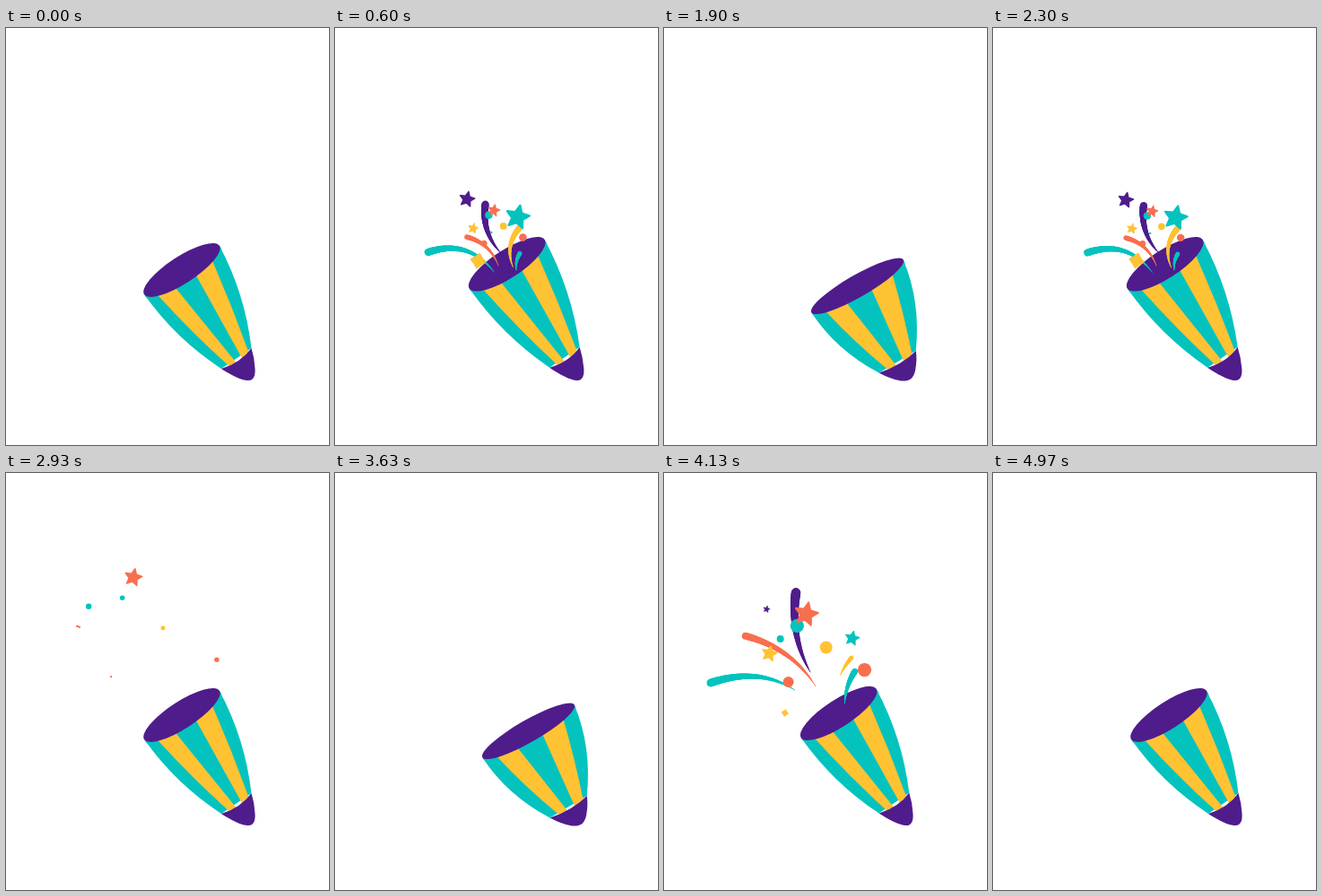
An HTML page with a canvas for the animation above (5 s loop, 360 by 465 pixels).

```html
<!DOCTYPE html>
<html lang="en">
<head>
<meta charset="utf-8">
<title>Party popper</title>
<style>
  html, body { margin: 0; width: 100%; height: 100%; overflow: hidden; background: #fff; }
  canvas { display: block; width: 360px; height: 465px; }
</style>
</head>
<body>
<canvas id="stage"></canvas>
<script>
const W = 360, H = 465, LOOP = 5000, FRAME = 100 / 3;
const PURPLE = '#4f1c8c', TEAL = '#04c3be', YELLOW = '#ffc233', ORANGE = '#f86f50';

const canvas = document.getElementById('stage');
const ctx = canvas.getContext('2d');
const dpr = window.devicePixelRatio || 1;
canvas.width = W * dpr;
canvas.height = H * dpr;

// Each shot winds up, bursts and ends (ms)
const SHOTS = [
  { start: 0, burst: 510, end: 1200 },
  { start: 1200, burst: 2165, end: 3230 },
  { start: 3310, burst: 3805, end: 4700 }
];

// Ages are fractions of a burst; confetti leaves slightly before the burst mark
const HEAD_START = 0.03;
const REF_AGE = 0.393;
const ORIGIN = { x: 195, y: 248 };

const STREAMERS = [
  { color: PURPLE, root: [185, 251], head: [144, 124], bend: -0.12, width: 13, reach: 0.5, delay: 0.02, life: 0.71 },
  { color: YELLOW, root: [199, 268], head: [209, 206], bend: -0.16, width: 8, reach: 0.3, delay: 0, life: 0.48 },
  { color: ORANGE, root: [182, 265], head: [79, 171], bend: 0.13, width: 9.5, reach: 0.5, delay: 0.05, life: 0.71 },
  { color: TEAL, root: [178, 273], head: [52, 234], bend: 0.18, width: 10.7, reach: 0.4, delay: 0, life: 0.72 },
  { color: TEAL, root: [202, 270], head: [214, 215], bend: -0.09, width: 8.3, reach: 0.5, delay: 0.05, life: 0.68 }
];

// Distance is the one reached at REF_AGE; angle in degrees
const CONFETTI = [
  { kind: 'star', color: PURPLE, angle: -130, distance: 125, size: 10.5, life: 0.455 },
  { kind: 'dot', color: TEAL, angle: -121, distance: 90, size: 7.7, life: 0.85 },
  { kind: 'star', color: ORANGE, angle: -112, distance: 97, size: 15, life: 1 },
  { kind: 'star', color: YELLOW, angle: -149, distance: 90, size: 9.6, life: 0.7 },
  { kind: 'dot', color: YELLOW, angle: -105, distance: 55, size: 7, life: 0.85 },
  { kind: 'dot', color: ORANGE, angle: -165, distance: 58, size: 6, life: 0.8 },
  { kind: 'diamond', color: YELLOW, angle: 162, distance: 63, size: 10, life: 0.46 },
  { kind: 'star', color: TEAL, angle: -77, distance: 65, size: 16.7, life: 0.48 },
  { kind: 'dot', color: ORANGE, angle: -45, distance: 40, size: 7.7, life: 0.85 },
  { kind: 'dot', color: TEAL, angle: -136, distance: 90, size: 4.5, life: 0.9, delay: 0.08 }
];

const clamp = x => Math.max(0, Math.min(1, x));
const span = (x, a, b) => clamp((x - a) / (b - a));
const lerp = (a, b, t) => a + (b - a) * t;
const smooth = x => x * x * (3 - 2 * x);
const rad = deg => deg * Math.PI / 180;
const quad = (a, q, b, t) => (1 - t) * (1 - t) * a + 2 * t * (1 - t) * q + t * t * b;

// Local frame: tip near (0, 0), mouth above it
const MOUTH = { y: -145, a: 50, b: 15 };
const SEAM = { l: [-23, -28.7], q: [-0.7, -22.5], r: [17.6, -29.7] };

const rim = k => [MOUTH.a * k, MOUTH.y + MOUTH.b * Math.sqrt(1 - k * k)];
const seam = t => [0, 1].map(i => quad(SEAM.l[i], SEAM.q[i], SEAM.r[i], t));

// Edge from rim to seam, rounder towards the outer sides
function edge(k, t) {
  const from = rim(k), to = seam(t);
  return { from, to, mid: [(from[0] + to[0]) / 2 + 11 * k ** 5, (from[1] + to[1]) / 2 + 3 * Math.abs(k ** 5)] };
}

function panel(color, left, right) {
  ctx.fillStyle = color;
  ctx.beginPath();
  ctx.moveTo(...left.from);
  ctx.quadraticCurveTo(...left.mid, ...left.to);
  ctx.lineTo(...right.to);
  ctx.quadraticCurveTo(...right.mid, ...right.from);
  ctx.lineTo(0, MOUTH.y);
  ctx.fill();
}

function oval(color, y) {
  ctx.fillStyle = color;
  ctx.beginPath();
  ctx.ellipse(0, y, MOUTH.a, MOUTH.b, 0, 0, 7);
  ctx.fill();
}

function drawCone(q, p) {
  const squash = Math.pow(span(q, 0, 0.64), 1.4) * (1 - smooth(span(q, 0.74, 1)));
  const stretch = smooth(span(p, -0.04, 0.1)) * (1 - smooth(span(p, 0.13, 0.5)));
  ctx.save();
  ctx.translate(274.9, 391.5);
  ctx.rotate(rad(-33 + 3.2 * squash));
  ctx.scale(1 + 0.18 * squash, 1 - 0.176 * squash + 0.054 * stretch);

  oval(TEAL, MOUTH.y + 3);
  panel(TEAL, edge(-1, 0), edge(1, 1));
  panel(YELLOW, edge(-0.75, 0.2), edge(-0.33, 0.41));
  panel(YELLOW, edge(0.2, 0.61), edge(0.68, 0.87));

  ctx.fillStyle = PURPLE;
  ctx.beginPath();
  ctx.moveTo(...SEAM.l);
  ctx.bezierCurveTo(-18, -17.5, -11, -5, -5, -1.4);
  ctx.bezierCurveTo(0, 1.9, 4.5, -1.2, 8.5, -8.2);
  ctx.quadraticCurveTo(14.6, -18.6, ...SEAM.r);
  ctx.quadraticCurveTo(...SEAM.q, ...SEAM.l);
  ctx.fill();
  oval(PURPLE, MOUTH.y);
  ctx.restore();
}

// A ribbon shoots out to its head, then its tail catches up along the curve
function drawStreamer({ color, root, head, bend, width, reach, delay, life }, p) {
  const age = p + HEAD_START - delay;
  if (age <= 0 || age >= life) return;
  const grow = Math.sin(Math.PI / 2 * clamp(age / reach));
  const cut = Math.pow(span(age, 0.13, life), 1.5);
  const [x, y] = root;
  const dx = (head[0] - x) * grow, dy = (head[1] - y) * grow;
  const qx = x + dx / 2 - 2 * bend * dy, qy = y + dy / 2 + 2 * bend * dx;
  const full = width * Math.sqrt(grow * (1 - cut));
  const steps = 48;
  const at = i => {
    const t = lerp(cut, 1, i / steps);
    return [quad(x, qx, x + dx, t), quad(y, qy, y + dy, t)];
  };
  ctx.strokeStyle = color;
  ctx.lineCap = 'round';
  for (let i = 0; i < steps; i++) {
    ctx.lineWidth = Math.max(0.8, full * Math.pow((i + 1) / steps, 0.75));
    ctx.beginPath();
    ctx.moveTo(...at(i));
    ctx.lineTo(...at(i + 1));
    ctx.stroke();
  }
}

function drawShape(kind, color, x, y, r, turn) {
  ctx.fillStyle = ctx.strokeStyle = color;
  ctx.beginPath();
  if (kind === 'dot') {
    ctx.arc(x, y, r, 0, 7);
    ctx.fill();
    return;
  }
  const [points, inner] = kind === 'star' ? [5, 0.45] : [4, 0.62];
  for (let i = 0; i < points * 2; i++) {
    const d = r * (i % 2 ? inner : 0.94);
    const a = i * Math.PI / points + rad(turn - 90);
    ctx.lineTo(x + d * Math.cos(a), y + d * Math.sin(a));
  }
  ctx.closePath();
  ctx.lineJoin = 'round';
  ctx.lineWidth = r * 0.14;
  ctx.fill();
  ctx.stroke();
}

// Pieces fly straight out with drag, swelling and shrinking over their life
function drawConfetti({ kind, color, angle, distance, size, life, delay = 0 }, p) {
  const age = p + HEAD_START - delay;
  if (age <= 0 || age >= life) return;
  const drag = 1.8 / life;
  const d = distance * (1 - Math.exp(-drag * age)) / (1 - Math.exp(-drag * (REF_AGE - delay)));
  const x = ORIGIN.x + d * Math.cos(rad(angle));
  const y = ORIGIN.y + d * Math.sin(rad(angle));
  drawShape(kind, color, x, y, size * Math.sin(Math.PI * age / life), 12);
}

function draw(time) {
  // 30 steps a second; the first two shots hold every third step
  let n = Math.floor((time % LOOP + 4) / FRAME);
  if (n < 99 && n % 3 === 2) n--;
  const t = n * FRAME;
  const shot = SHOTS.filter(s => t >= s.start - 1).pop();
  const q = (t - shot.start) / (shot.burst - shot.start);
  const p = (t - shot.burst) / (shot.end - shot.burst);

  ctx.setTransform(dpr, 0, 0, dpr, 0, 0);
  ctx.fillStyle = '#fff';
  ctx.fillRect(0, 0, W, H);
  drawCone(q, p);
  STREAMERS.forEach(s => drawStreamer(s, p));
  CONFETTI.forEach(c => drawConfetti(c, p));
}

const began = performance.now();
function tick() {
  draw(performance.now() - began);
  requestAnimationFrame(tick);
}
tick();
</script>
</body>
</html>
```
